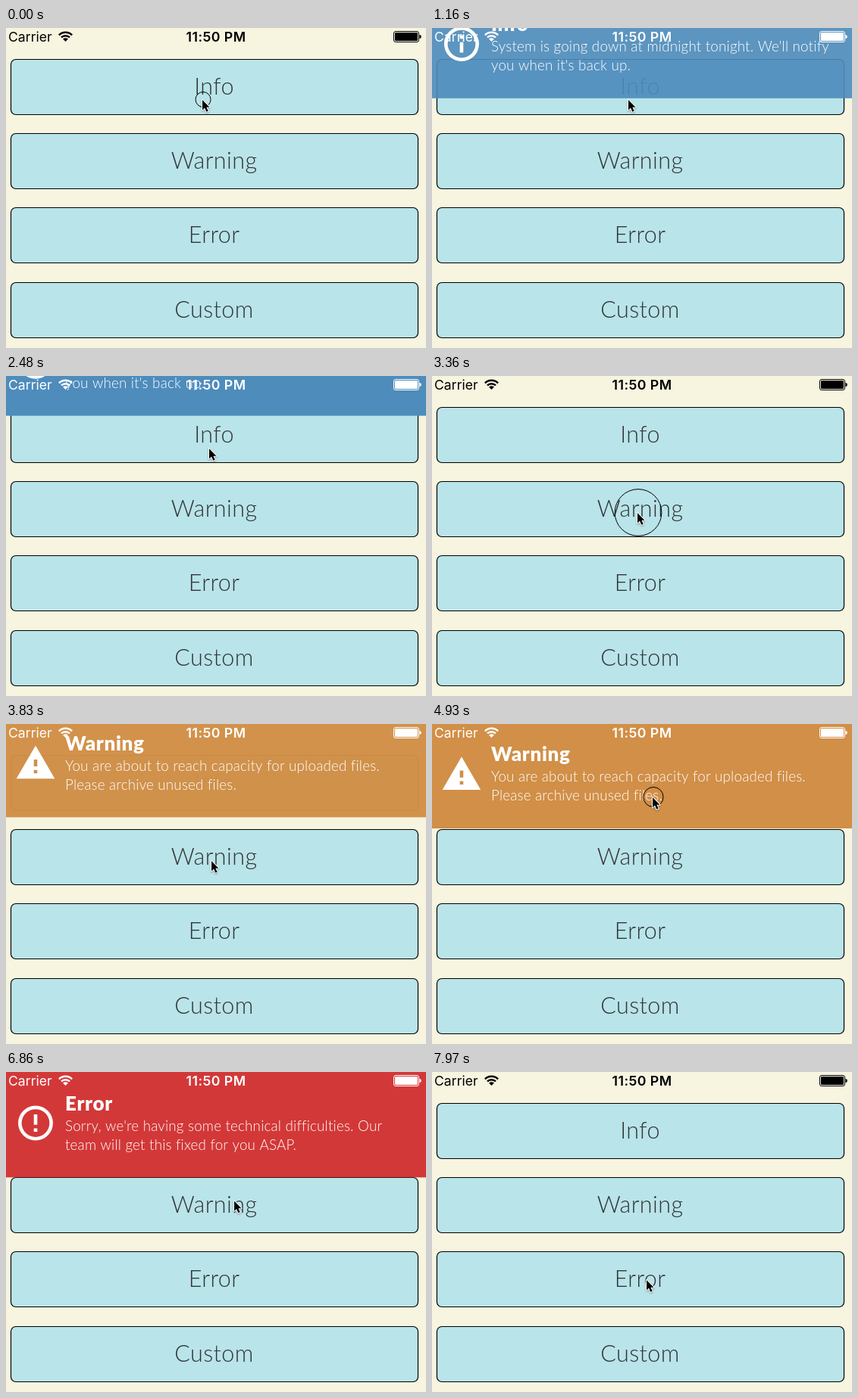
Animation, 554 px wide and 423 px high, one loop 8000 ms. Source, as an HTML page with a canvas:

```html
<!DOCTYPE html>
<html lang="en">
<head>
<meta charset="utf-8">
<title>Message banners</title>
<style>
html, body { margin: 0; width: 100%; height: 100%; overflow: hidden; background: #f7f4e0; }
canvas { display: block; width: 554px; height: 423px; }
</style>
</head>
<body>
<canvas id="stage"></canvas>
<script>
const W = 554, H = 423, LOOP = 8000;
const canvas = document.getElementById('stage');
const ctx = canvas.getContext('2d');
const dpr = window.devicePixelRatio || 1;
canvas.width = W * dpr;
canvas.height = H * dpr;

const BANNER_H = 138;
const SHOW_DELAY = 285, HIDE_DELAY = 220, HIDE_MS = 300, RESTORE_DELAY = 585;
const TAP_MS = 240;

const BUTTONS = ['Info', 'Warning', 'Error', 'Custom'];

// Icons live on a 24-unit grid
const RING = 'M12 2a10 10 0 1 0 0 20a10 10 0 1 0 0-20zM12 4a8 8 0 1 1 0 16a8 8 0 1 1 0-16z';
const BANNERS = [
  { open: 750, close: 2090, color: '#4e8cbc', title: 'Info',
    lines: ["System is going down at midnight tonight. We'll notify", "you when it's back up."],
    icon: new Path2D(RING + 'M11 7h2v2h-2zM11 11h2v6h-2z') },
  { open: 3360, close: 4760, color: '#d18f47', title: 'Warning',
    lines: ['You are about to reach capacity for uploaded files.', 'Please archive unused files.'],
    icon: new Path2D('M1 21h22L12 2zM11 16h2v2h-2zM11 10h2v4h-2z') },
  { open: 6170, close: 7380, color: '#d33838', title: 'Error',
    lines: ["Sorry, we're having some technical difficulties. Our", 'team will get this fixed for you ASAP.'],
    icon: new Path2D(RING + 'M11 7h2v6h-2zM11 15h2v2h-2z') }
];

// Time, x, y of the pointer tip
const POINTER = [
  [0, 259, 95], [1860, 259, 95], [2000, 268, 96], [2500, 268, 96], [2660, 269, 137],
  [2880, 271, 183], [3000, 271, 181], [4170, 271, 181], [4460, 291, 97], [5300, 291, 97],
  [5520, 267, 251], [5690, 269, 290], [5800, 273, 279], [6680, 273, 279], [6860, 301, 171],
  [6970, 305, 112], [7080, 305, 95], [7650, 305, 95], [7950, 283, 275], [8000, 283, 275]
];

const ARROW = new Path2D('M0 0V13.4L3 10.6L5.3 15.8L7.7 14.8L5.4 9.8H9.5Z');

const clamp = v => Math.max(0, Math.min(1, v));
const mix = (a, b, p) => a + (b - a) * p;

// Step response of a spring with damping ratio 0.8
function spring(ms) {
  if (ms <= 0) return 0;
  const a = ms * 0.0158, d = 0.8, f = 0.6;
  return 1 - Math.exp(-d * a) * (Math.cos(f * a) + d / f * Math.sin(f * a));
}

function easeInOut(p) {
  if (p <= 0) return 0;
  if (p >= 1) return 1;
  let lo = 0, hi = 1, s = p;
  for (let i = 0; i < 20; i++) {
    s = (lo + hi) / 2;
    const x = 1.26 * s * (1 - s) * (1 - s) + 1.74 * s * s * (1 - s) + s * s * s;
    if (x < p) lo = s; else hi = s;
  }
  return s * s * (3 - 2 * s);
}

function pointerAt(t) {
  const i = Math.max(1, POINTER.findIndex(k => k[0] > t));
  const a = POINTER[i - 1], b = POINTER[i];
  const p = clamp((t - a[0]) / (b[0] - a[0]));
  return [mix(a[1], b[1], p), mix(a[2], b[2], p)];
}

function text(str, x, y, font, color, { align = 'left', spacing = 0 } = {}) {
  ctx.font = font;
  ctx.letterSpacing = spacing + 'px';
  ctx.fillStyle = color;
  ctx.textAlign = align;
  ctx.fillText(str, x, y);
}

function box(x, y, w, h, r) {
  ctx.beginPath();
  ctx.roundRect(x, y, w, h, r);
}

function drawButtons() {
  BUTTONS.forEach((label, i) => {
    const y = Math.round(40.8 + i * 98.25);
    box(6.5, y + 0.5, 537, 73, 6.5);
    ctx.fillStyle = '#b9e4e9';
    ctx.fill();
    ctx.strokeStyle = '#000';
    ctx.lineWidth = 1.2;
    ctx.stroke();
    text(label, 274.5, y + 47, '300 30.5px Lato, sans-serif', '#303436', { align: 'center', spacing: 0.4 });
  });
}

function drawBanner(b, t) {
  const p = spring(t - b.open - SHOW_DELAY);
  const out = easeInOut((t - b.close - HIDE_DELAY) / HIDE_MS);
  if (p <= 0 || out >= 1) return;
  const bottom = BANNER_H * p * (1 - out);
  ctx.save();
  ctx.globalAlpha = clamp(0.72 + 0.28 * p);
  ctx.fillStyle = b.color;
  ctx.fillRect(0, 0, W, bottom);
  ctx.globalAlpha = 1;
  text(b.title, 78, bottom - 88.5, '900 26px Lato, sans-serif', '#fff', { spacing: 0.7 });
  b.lines.forEach((line, i) =>
    text(line, 78, bottom - 61.5 + i * 24.7, '300 18.8px Lato, sans-serif', '#fff', { spacing: 0.2 }));
  ctx.translate(11.4, bottom - 99.4);
  ctx.scale(2.3, 2.3);
  ctx.fillStyle = '#fff';
  ctx.fill(b.icon, 'evenodd');
  ctx.restore();
}

function drawStatus(color) {
  text('Carrier', 3, 18, '17.6px Inter, sans-serif', color);
  text('11:50 PM', 277, 18, '600 17.8px Inter, sans-serif', color, { align: 'center', spacing: 0.4 });

  // Wi-Fi fan
  ctx.strokeStyle = ctx.fillStyle = color;
  ctx.lineWidth = 2.5;
  const cx = 78.5, cy = 18, from = -Math.PI * 0.75, to = -Math.PI * 0.25;
  for (const r of [12.2, 7.8]) {
    ctx.beginPath();
    ctx.arc(cx, cy, r, from, to);
    ctx.stroke();
  }
  ctx.beginPath();
  ctx.moveTo(cx, cy);
  ctx.arc(cx, cy, 4.8, from, to);
  ctx.fill();

  // Battery
  ctx.lineWidth = 1;
  box(511.5, 4.5, 33, 14, 2.5);
  ctx.stroke();
  box(513, 6, 30, 11, 1.2);
  ctx.fill();
  box(545.5, 9, 2.2, 5, [0, 2, 2, 0]);
  ctx.fill();
}

function drawTap(t, x, y) {
  const starts = [-200, ...BANNERS.flatMap(b => [b.open, b.close])];
  const start = starts.find(s => t >= s && t < s + TAP_MS);
  if (start === undefined) return;
  ctx.beginPath();
  ctx.arc(x + 1, y - 0.5, mix(31, 10, clamp((t - start) / 200)), 0, Math.PI * 2);
  ctx.strokeStyle = '#000';
  ctx.lineWidth = 1;
  ctx.stroke();
}

function drawPointer(x, y) {
  ctx.save();
  ctx.translate(x, y);
  ctx.lineJoin = 'round';
  ctx.lineWidth = 2;
  ctx.strokeStyle = '#fff';
  ctx.shadowColor = 'rgba(0,0,0,.35)';
  ctx.shadowBlur = 2 * dpr;
  ctx.shadowOffsetY = dpr;
  ctx.stroke(ARROW);
  ctx.shadowColor = 'transparent';
  ctx.fillStyle = '#000';
  ctx.fill(ARROW);
  ctx.restore();
}

function draw(t) {
  ctx.setTransform(dpr, 0, 0, dpr, 0, 0);
  ctx.fillStyle = '#f7f4e0';
  ctx.fillRect(0, 0, W, H);
  drawButtons();
  BANNERS.forEach(b => drawBanner(b, t));
  const light = BANNERS.some(b => t >= b.open + SHOW_DELAY && t < b.close + RESTORE_DELAY);
  drawStatus(light ? '#fff' : '#000');
  const [x, y] = pointerAt(t);
  drawTap(t, x, y);
  drawPointer(x, y);
}

const begin = performance.now();
function tick() {
  draw((performance.now() - begin) % LOOP);
  requestAnimationFrame(tick);
}
tick();
</script>
</body>
</html>
```
